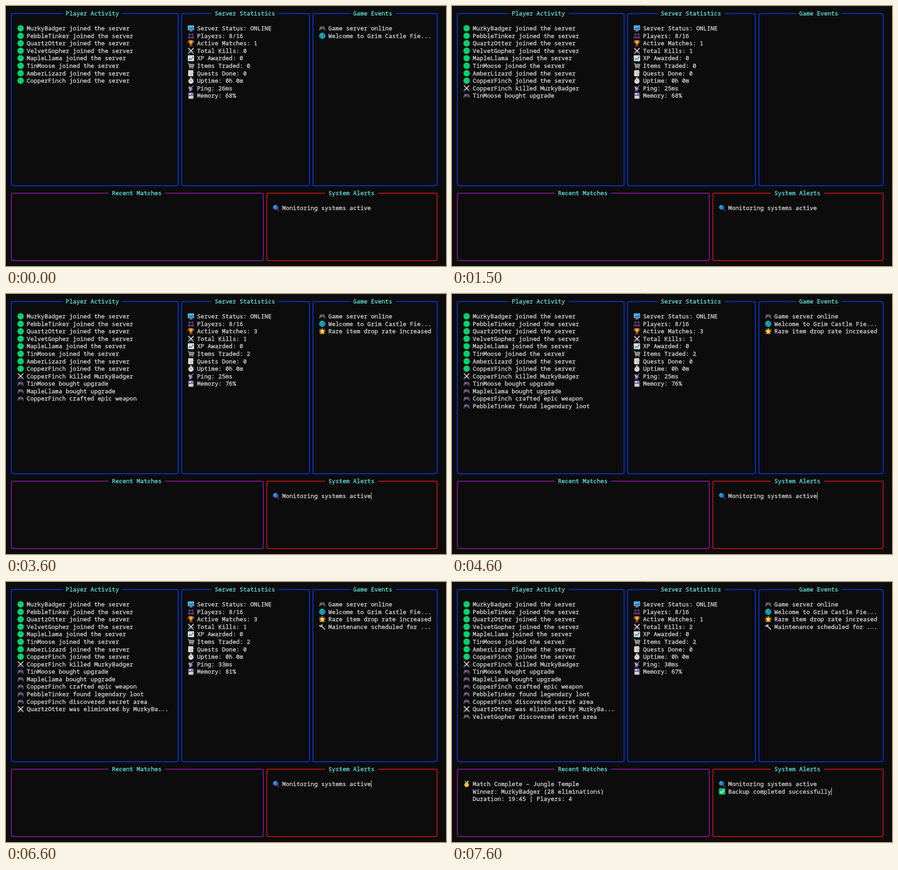
Recreate the animation shown at these times as an HTML page. Size 973 by 576 pixels, loop 8000 ms.

```html
<!DOCTYPE html>
<html lang="en">
<head>
<meta charset="utf-8">
<title>Game server dashboard</title>
<style>
  html, body { margin: 0; width: 100%; height: 100%; overflow: hidden; background: #0c0c0c; }
  svg { display: block; width: 100%; height: 100%; }
  text { font: 500 13.08px "Noto Sans Mono", "DejaVu Sans Mono", monospace; white-space: pre;
    fill: #ccc; stroke: #ccc; stroke-width: .45px; }
  .title { fill: #61d6d6; stroke: #61d6d6; }
</style>
</head>
<body>
<svg viewBox="0 0 973 576">
  <path d="M428 .5H973" stroke="#262626"/>
  <g id="frame"></g>
  <g id="content"></g>
</svg>
<script>
const LOOP = 8000;
const CELL = 7.847, ROW = 16.58;
const textX = col => 45.8 + col * CELL;
const baseline = row => 20.9 + row * ROW;
const lineX = col => 11.8 + col * CELL;
const lineY = row => 16.8 + row * ROW;

// Icons live in a 16 x 16 box.
const icons = {
  dot: '<circle cx="8" cy="8" r="7.1" fill="#00d26a"/>',
  screen: '<rect x="1" y="1.5" width="14" height="10.5" rx="1" fill="#b4acbc"/><path d="M2 2.5h12v8H2z" fill="#26b8f4"/><path d="M2 8l12-3v5.500H2z" fill="#1687dd"/><path d="M6.500 12h3v1.500h2.500v1.200H4v-1.200h2.500z" fill="#8f879b"/>',
  people: '<g fill="#533566"><circle cx="4.700" cy="5" r="2.700"/><circle cx="11.300" cy="5" r="2.700"/><path d="M.8 14q0-5.500 3.800-5.500T8 14zM8.200 14q0-5.500 3.500-5.500t3.500 5.500z"/></g>',
  trophy: '<path d="M4 3H1.800q0 4.500 4 5M12 3h2.200q0 4.500-4 5" fill="none" stroke="#d67d00" stroke-width="1.400"/><path d="M4 1.500h8q0 7-2.700 8v2H6.700v-2Q4 8.500 4 1.500z" fill="#f9a22c"/><path d="M4.500 11.500h7v3.200h-7z" fill="#7d4533"/>',
  swords: '<path d="M2 2l9.500 9.500M14 2l-9.500 9.500" stroke="#d8d8d8" stroke-width="2"/><path d="M2.500 9l4.500 4.500M13.500 9L9 13.500" stroke="#8a8490" stroke-width="1.400"/><path d="M4 12l-2.500 2.500M12 12l2.500 2.500" stroke="#a69a9a" stroke-width="2"/>',
  chart: '<rect x="1" y="1.500" width="14" height="13" rx="1" fill="#e4e4e8"/><path d="M1 6h14M1 10h14M5.500 2v12M10.500 2v12" stroke="#b9c3d3" stroke-width=".7"/><path d="M2.500 12.500l3.500-4 2.500 2 5-6.500" fill="none" stroke="#138f75" stroke-width="1.600"/>',
  cart: '<path d="M1 2.500h2.200l1.800 9h8.500" fill="none" stroke="#aaa5b0" stroke-width="1.300"/><path d="M3.700 4.500H15l-1.300 5.500H4.800z" fill="#706a78" stroke="#c4c0c8"/><path d="M7 5v5M9.500 5v5M12 5v5" stroke="#b7b2bc" stroke-width=".7"/><circle cx="6" cy="13.500" r="1.300" fill="#999"/><circle cx="12.500" cy="13.500" r="1.300" fill="#999"/>',
  memo: '<path d="M2 1.500h11v13H2z" fill="#eee"/><path d="M4 4.500h7M4 7h6M4 9.500h4" stroke="#a0a0b0"/><path d="M8 12.500l5.500-6" stroke="#f9a02e" stroke-width="2.200"/><path d="M13 7l1.500-1.500" stroke="#f0437a" stroke-width="2.200"/>',
  stopwatch: '<path d="M6.500 1h3v3h-3zM12 3l1.500 1.500" fill="#aaa" stroke="#aaa" stroke-width="1.300"/><circle cx="8" cy="9" r="5.300" fill="#f1f1f1" stroke="#b7aeb9" stroke-width="1.200"/><path d="M8 9.500l-2-4" stroke="#444" stroke-width="1.200"/><path d="M8 9h3" stroke="#e5434f"/>',
  dish: '<path d="M5 10l3 1 2 4H3z" fill="#79718a"/><path d="M3 4q-1 8 8.500 8z" fill="#c9c5d0"/><path d="M3 4l8.500 8q1-5-2.500-7T3 4z" fill="#716b80"/><path d="M7.500 8l4-4" stroke="#ccc"/><circle cx="12" cy="3.500" r="1.400" fill="#3c83c7"/>',
  floppy: '<path d="M1.500 1.500h12l1.200 1.200v11.800H1.500z" fill="#674d8f"/><path d="M4 1.500h8v4.800H4z" fill="#c9c2d2"/><path d="M9 2.300h2v3H9z" fill="#554071"/><path d="M3.500 8.500h9v6h-9z" fill="#f2f0f4"/><path d="M4.500 10.500h7M4.500 12.500h7" stroke="#e47f9a" stroke-width=".8"/>',
  gamepad: '<path d="M4 4q4-1.200 8 0c2.500 1 3.500 9 2.500 9.500-2 .8-2.500-3-4-3.500h-5C4 10.500 3.500 14.300 1.500 13.500.5 13 1.500 5 4 4z" fill="#57456b"/><path d="M3 7h4M5 5v4" stroke="#9a8cab" stroke-width="1.100"/><circle cx="11" cy="5.700" r=".8" fill="#c04c68"/><circle cx="12.700" cy="7.200" r=".8" fill="#3b94b8"/><circle cx="10.800" cy="8.500" r=".8" fill="#6d9a58"/>',
  globe: '<circle cx="8" cy="8" r="7.100" fill="#1481d8"/><path d="M4 2.500q4-2 6-1L9 4 6.500 5l1 2.500 3.500 1-1.500 5-2 1-.5-4-3.500-2.500zM12 4l2.500 2.500v3L12.500 8z" fill="#27b668"/>',
  star: '<path d="M8 .5v15M.5 8h15M2.500 2.500l11 11M13.500 2.500l-11 11" stroke="#f99a28" stroke-width="1.400"/><path d="M8 1.500l2 4.200 4.600.6-3.400 3.200.9 4.600L8 11.900l-4.100 2.200.9-4.600L1.400 6.300 6 5.700z" fill="#fcd53f"/>',
  wrench: '<path d="M5.500 5.500l8 8" stroke="#aaa6ae" stroke-width="2.800" stroke-linecap="round"/><path d="M2 4.500q.8 3 3.500 2.400T6.800 2.500" fill="none" stroke="#d2ced5" stroke-width="2.300"/>',
  lens: '<path d="M9.500 9.500l4.500 4.500" stroke="#493c69" stroke-width="2.800" stroke-linecap="round"/><circle cx="6.500" cy="6.500" r="5" fill="#1686df" stroke="#3d5f93" stroke-width="1.200"/><path d="M4 6q.5-2 2.500-2.500" fill="none" stroke="#71c7fa" stroke-width="1.200"/>',
  medal: '<path d="M2.500 1h4L9 6 6.500 7.500z" fill="#3285ce"/><path d="M13.500 1h-4L7 6l2.500 1.500z" fill="#e6b84a"/><circle cx="8" cy="10" r="5" fill="#f9b72f"/><circle cx="8" cy="10" r="3" fill="#ffda65"/><path d="M8 8v4" stroke="#c97b16" stroke-width="1.200"/>',
  check: '<rect x="1" y="1" width="14" height="14" rx="2" fill="#00c864"/><path d="M4 8.200l2.800 3L12 5" fill="none" stroke="#fff" stroke-width="2"/>'
};

// [left, right, top, bottom, title column, title, colour] in terminal cells
const panels = [
  [0, 47, 0, 23, 11, 'Player Activity', '#0037da'],
  [48, 84, 0, 23, 53, 'Server Statistics', '#0037da'],
  [85, 120, 0, 23, 92, 'Game Events', '#0037da'],
  [0, 71, 24, 33, 24, 'Recent Matches', '#881798'],
  [72, 120, 24, 33, 85, 'System Alerts', '#c50f1f']
];

const players = ['MurkyBadger', 'PebbleTinker', 'QuartzOtter', 'VelvetGopher',
  'MapleLlama', 'TinMoose', 'AmberLizard', 'CopperFinch'];
const [badger, tinker, otter, gopher, llama, moose, , finch] = players;

// Log entries: [time of appearance, icon, text]
const activity = [
  ...players.map(name => [0, 'dot', `${name} joined the server`]),
  [400, 'swords', `${finch} killed ${badger}`],
  [1500, 'gamepad', `${moose} bought upgrade`],
  [2600, 'gamepad', `${llama} bought upgrade`],
  [3600, 'gamepad', `${finch} crafted epic weapon`],
  [4600, 'gamepad', `${tinker} found legendary loot`],
  [5600, 'gamepad', `${finch} discovered secret area`],
  [6600, 'swords', `${otter} was eliminated by ${badger.slice(0, 7)}...`],
  [7600, 'gamepad', `${gopher} discovered secret area`]
];
const events = [
  [0, 'gamepad', 'Game server online'],
  [0, 'globe', 'Welcome to Grim Castle Fie...'],
  [2600, 'star', 'Rare item drop rate increased'],
  [5600, 'wrench', 'Maintenance scheduled for ...']
];
const matches = [
  [7600, 'medal', 'Match Complete – Jungle Temple'],
  [7600, '', `Winner: ${badger} (28 eliminations)`],
  [7600, '', 'Duration: 19:45 | Players: 4']
];
const alerts = [
  [0, 'lens', 'Monitoring systems active'],
  [7600, 'check', 'Backup completed successfully']
];

const eventsCleared = [[1500, 1600], [2500, 2600], [5500, 5600], [7500, 7600]];
const cursorShown = [[500, 900], [1600, 2000], [3100, 5500], [5600, 7500], [7600, LOOP]];
const within = (spans, t) => spans.some(([from, to]) => t >= from && t < to);

// Statistics refresh every two seconds.
function statistics(t) {
  const tick = Math.floor((t + 500) / 2000);
  const pick = (...values) => values[tick];
  return [
    ['screen', 'Server Status: ONLINE'],
    ['people', 'Players: 8/16'],
    ['trophy', `Active Matches: ${pick(1, 1, 3, 3, 1)}`],
    ['swords', `Total Kills: ${pick(0, 1, 1, 1, 2)}`],
    ['chart', 'XP Awarded: 0'],
    ['cart', `Items Traded: ${pick(0, 0, 2, 2, 2)}`],
    ['memo', 'Quests Done: 0'],
    ['stopwatch', 'Uptime: 0h 0m'],
    ['dish', `Ping: ${pick(26, 25, 25, 33, 30)}ms`],
    ['floppy', `Memory: ${pick(68, 68, 76, 81, 67)}%`]
  ].map(line => [0, ...line]);
}

function drawPanel([left, right, top, bottom, col, title, color]) {
  const x1 = lineX(left), x2 = lineX(right), y1 = lineY(top), y2 = lineY(bottom), r = 4;
  const gapStart = textX(col - 1) + .5, gapEnd = textX(col + title.length + 1);
  return `<path fill="none" stroke="${color}" stroke-width="2" d="M${gapStart} ${y1}H${x1 + r}
    Q${x1} ${y1} ${x1} ${y1 + r}V${y2 - r}Q${x1} ${y2} ${x1 + r} ${y2}H${x2 - r}
    Q${x2} ${y2} ${x2} ${y2 - r}V${y1 + r}Q${x2} ${y1} ${x2 - r} ${y1}H${gapEnd}"/>
    <text class="title" x="${textX(col)}" y="${baseline(top)}">${title}</text>`;
}

function drawLines(lines, col, firstRow, t) {
  return lines.filter(([time]) => time <= t).map(([, icon, text], i) => {
    const x = textX(col), y = baseline(firstRow + i);
    const mark = icon && `<g transform="translate(${x - 21.5} ${y - 12.6})">${icons[icon]}</g>`;
    return `${mark}<text x="${x}" y="${y}">${text}</text>`;
  }).join('');
}

function drawCursor(t) {
  if (!within(cursorShown, t)) return '';
  const visible = alerts.filter(([time]) => time <= t);
  const x = textX(72 + visible.at(-1)[2].length);
  const y = baseline(25 + visible.length) - 12.9;
  return `<rect x="${x + .3}" y="${y}" width="1.2" height="16.6" fill="#ccc"/>`;
}

const content = document.getElementById('content');
document.getElementById('frame').innerHTML = panels.map(drawPanel).join('');

let shown = '';
function render() {
  const t = performance.now() % LOOP;
  const markup = drawLines(activity, 0, 2, t)
    + drawLines(statistics(t), 48, 2, t)
    + (within(eventsCleared, t) ? '' : drawLines(events, 85, 2, t))
    + drawLines(matches, 0, 26, t)
    + drawLines(alerts, 72, 26, t)
    + drawCursor(t);
  if (markup !== shown) content.innerHTML = shown = markup;
  requestAnimationFrame(render);
}
render();
</script>
</body>
</html>
```
